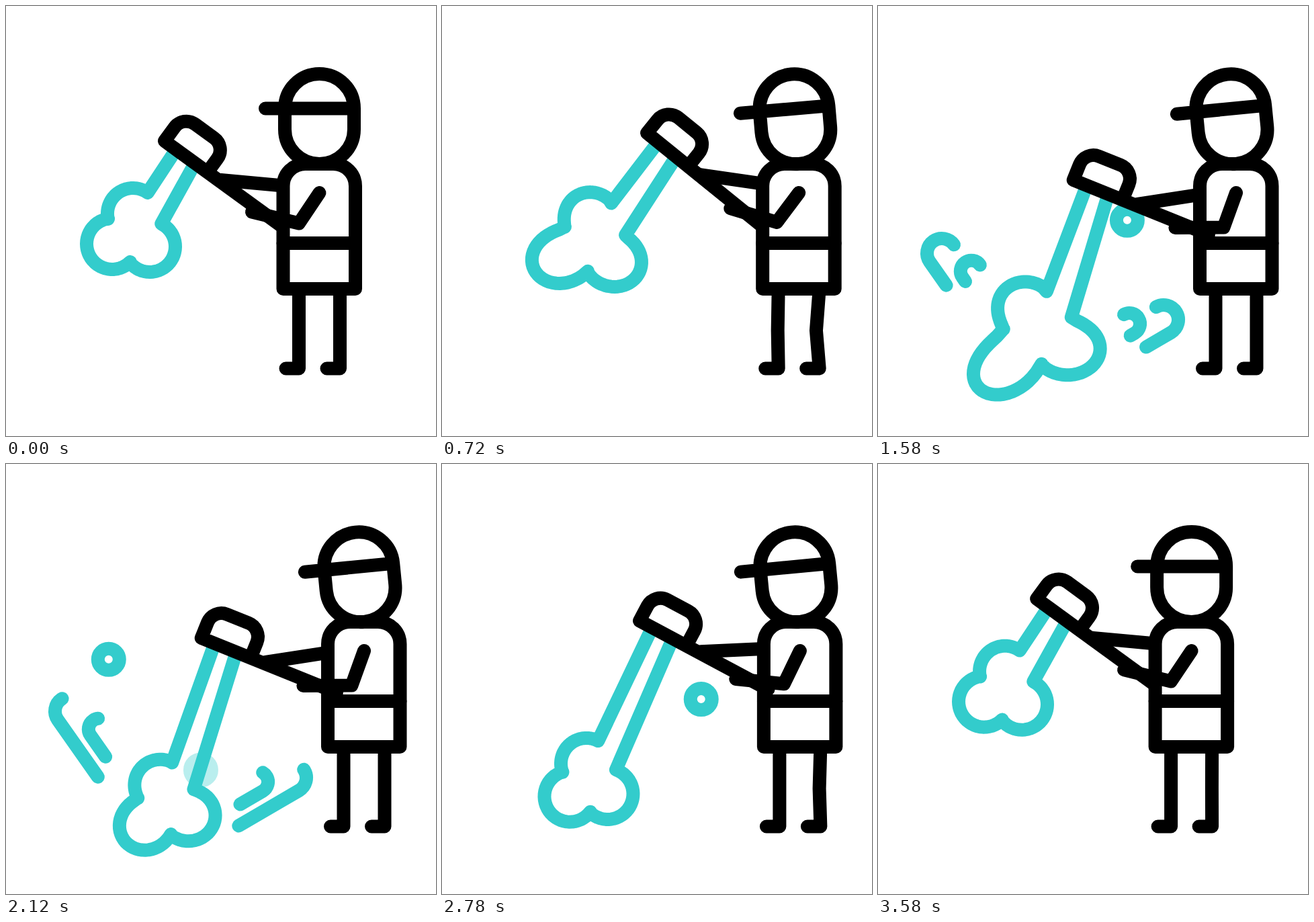
Animation of 640 by 640 pixels, one loop 3.6 s. Source, as an HTML page:

```html
<!DOCTYPE html>
<html lang="en">
<head>
<meta charset="utf-8">
<title>Spraying worker</title>
<style>
  html, body { margin: 0; width: 100%; height: 100%; overflow: hidden; background: #fff; }
  svg { display: block; width: 100vw; height: 100vh; }
  g { fill: none; stroke-width: 20; stroke-linecap: round; stroke-linejoin: round; }
  .water { stroke: #3cc; }
  .ink { stroke: #000; }
</style>
</head>
<body>
<svg viewBox="0 0 640 640">
  <g class="water">
    <g id="drops"></g>
    <g id="splashes"></g>
    <path id="cloud"/>
  </g>
  <g class="ink">
    <path class="arms" d="M320 259L440 270"/>
    <path id="legL"/>
    <path id="legR"/>
    <g id="body">
      <path fill="#fff" d="M412.5 421V268a33 33 0 0 1 33-33h41.5a33 33 0 0 1 33 33V421z"/>
      <path d="M412.5 353H520"/>
    </g>
    <path id="head" d="M415 152.5a51.500 51.500 0 0 1 103 0v31a51.5 51.5 0 0 1-103 0zM386 152.5H518"/>
    <g class="arms">
      <path d="M366 306.5L436 323.5L466.5 278"/>
      <path transform="translate(236 201) rotate(36)" d="M217 0H0V-25a22 22 0 0 1 22-22H57a22 22 0 0 1 22 22V0"/>
    </g>
  </g>
</svg>
<script>
const LOOP = 3600, RAD = Math.PI / 180;
const $ = id => document.getElementById(id);
const clamp = x => Math.min(1, Math.max(0, x));
const mix = (a, b, k) => a + (b - a) * k;

function ramp(t, from, to) {
  const x = clamp((t - from) / (to - from));
  return x * x * (3 - 2 * x);
}

// Two strides between the given times
const gait = (t, from, to) => -10 * Math.sin(2 * Math.PI * clamp((t - from) / (to - from))) ** 2;

const motion = {
  walk:  t => 66.5 * (ramp(t, 0, 800) - ramp(t, 2760, 3600)),
  swing: t => 24 * (ramp(t, 0, 400) - ramp(t, 2960, 3600)) - 38 * (ramp(t, 400, 1000) - ramp(t, 2720, 2960)),
  tilt:  t => 5.6 * (ramp(t, 0, 390) - 2 * ramp(t, 390, 780) + 2 * ramp(t, 2760, 3200) - ramp(t, 3200, 3600)),
  kneeL: t => gait(t, 0, 760) + gait(t, 2800, 3460),
  kneeR: t => gait(t, 0, 820) + gait(t, 2720, 3600),
  reach: t => 95 * ramp(t, 500, 1000) + 17 * ramp(t, 1580, 2120) - 112 * ramp(t, 2720, 3460),
  bulge: t => ramp(t, 400, 1040) - 0.8 * ramp(t, 1580, 2120) - 0.2 * ramp(t, 2120, 2400)
};

const puffs = [
  { cx: 189, cy: 309, from: -55, to: -192, bx: -2, by: -18 },
  { cx: 158, cy: 354, from: -99, to: -315, bx: -20, by: 23 },
  { cx: 214, cy: 358, from: -220, to: -423, bx: 5, by: 14 }
];

const drops = [
  { start: 1060, life: 700, from: [292, 458], to: [398, 271] },
  { start: 1600, life: 1020, from: [222, 372], to: [86.5, 213] },
  { start: 2080, life: 820, from: [284, 462], to: [403, 331] }
];

// A large and a small hook, placed on both sides
const hooks = ["M104-22H0a22 22 0 0 0 0 44", "M86 4.5H47a16 16 0 0 0 0 32"];
const sides = ["translate(95 368) rotate(54.9) scale(1 -1)", "translate(425 467) rotate(149.7)"];
const bursts = [1040, 1865];

function add(parent, tag, attrs) {
  const el = document.createElementNS("http://www.w3.org/2000/svg", tag);
  set(el, attrs);
  return parent.appendChild(el);
}

function set(el, attrs) {
  for (const k in attrs) el.setAttribute(k, attrs[k]);
}

for (const d of drops) d.el = add($("drops"), "circle", { r: 16 });
const burstEls = bursts.map(() => sides.flatMap(transform =>
  hooks.map(d => add($("splashes"), "path", { d, transform, pathLength: 1 }))));
const rigid = [...document.querySelectorAll(".arms"), $("cloud")];

function cloudPath(reach, bulge) {
  const steps = 32, pts = ["251 217"];
  for (const p of puffs) {
    for (let i = 0; i <= steps; i++) {
      const k = i / steps, a = mix(p.from, p.to, k) * RAD;
      const swell = bulge * Math.max(0, Math.sin(Math.PI * k)) ** 0.5;
      const x = p.cx + 38 * Math.cos(a), y = p.cy + 38 * Math.sin(a);
      const wide = bulge * 0.29 * (x - 215);
      pts.push(`${x + wide - 0.55 * reach + p.bx * swell} ${y - 5 * bulge + 0.835 * reach + p.by * swell}`);
    }
  }
  return "M" + pts.join("L") + "L279 238";
}

const legPath = (x, bend) => `M${x} 421L${x + bend} 483L${x} 539.5H${x - 19.5}`;

function drawDrops(t) {
  for (const { el, start, life, from, to } of drops) {
    const age = t - start, k = clamp(age / life);
    set(el, {
      cx: mix(from[0], to[0], k),
      cy: mix(from[1], to[1], k),
      opacity: clamp(Math.min(age, life - age) / 120)
    });
  }
}

function drawSplashes(t) {
  bursts.forEach((start, i) => {
    const tip = ramp(t, start, start + 355), tail = ramp(t, start + 300, start + 900);
    for (const el of burstEls[i]) set(el, {
      visibility: tip > 0.01 && tail < 0.99 ? "visible" : "hidden",
      "stroke-dasharray": `${Math.max(0.001, tip - tail)} 3`,
      "stroke-dashoffset": -tail
    });
  });
}

function draw(t) {
  const v = {};
  for (const k in motion) v[k] = motion[k](t);
  const move = `translate(${v.walk} 0)`;
  set($("body"), { transform: move });
  set($("head"), { transform: `${move} rotate(${v.tilt} 466.5 235)` });
  for (const el of rigid) set(el, { transform: `${move} rotate(${v.swing} 466.5 278)` });
  set($("legL"), { d: legPath(436 + v.walk, v.kneeL) });
  set($("legR"), { d: legPath(497 + v.walk, v.kneeR) });
  set($("cloud"), { d: cloudPath(v.reach, v.bulge) });
  drawDrops(t);
  drawSplashes(t);
}

const begin = performance.now();
function tick() {
  draw((performance.now() - begin) % LOOP);
  requestAnimationFrame(tick);
}
tick();
</script>
</body>
</html>
```
